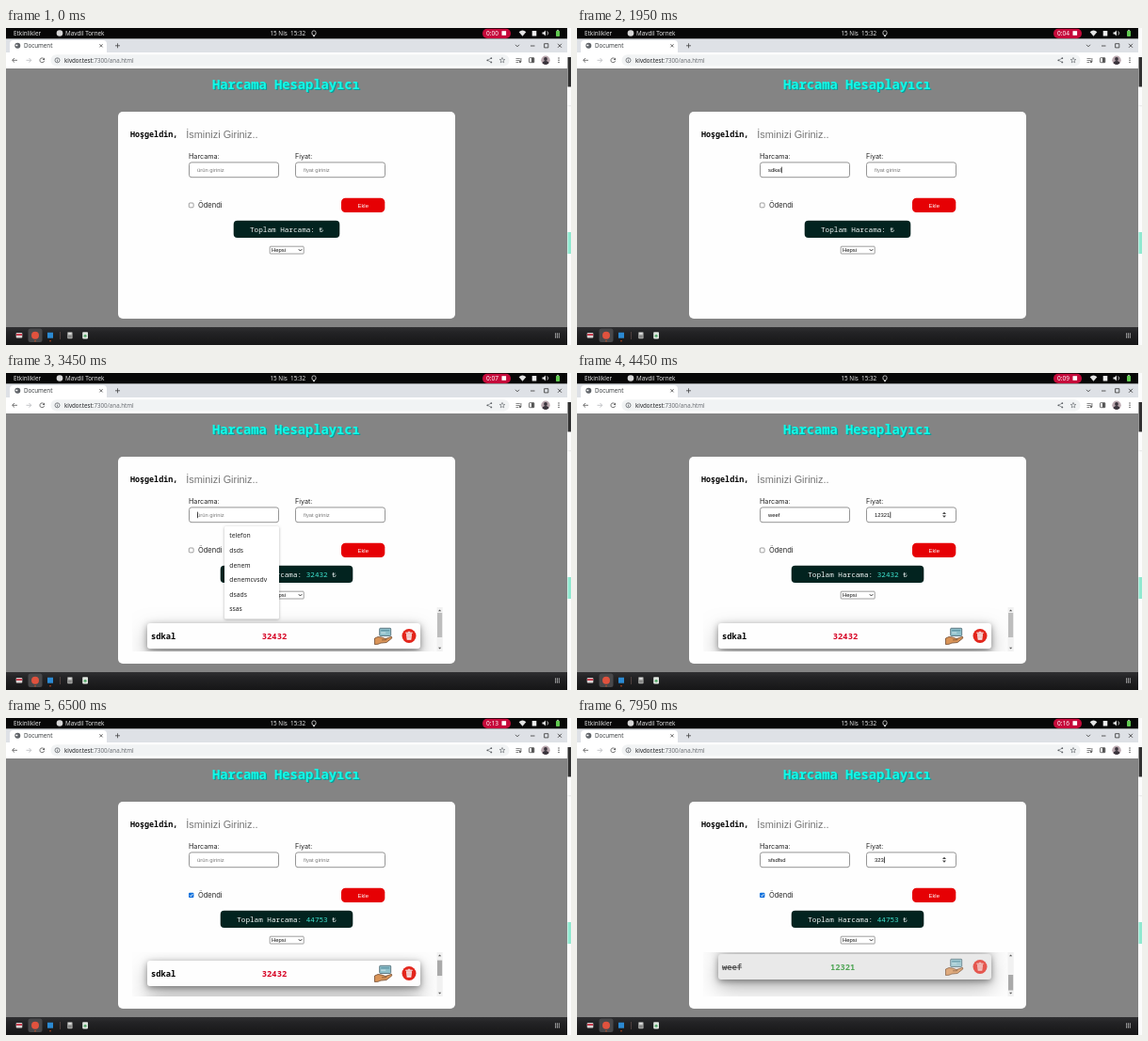
These frames come from a looping animation (600 px wide and 337 px high, 8000 ms). An HTML page with a canvas:

```html
<!DOCTYPE html>
<html lang="tr">
<head>
<meta charset="utf-8">
<title>Harcama Hesaplayıcı</title>
<style>
html, body { margin: 0; width: 100%; height: 100%; overflow: hidden; background: #848484; }
canvas { display: block; width: 600px; height: 337px; }
</style>
</head>
<body>
<canvas id="stage"></canvas>
<script>
const W = 600, H = 337, LOOP = 8000;
const canvas = document.getElementById('stage');
const ctx = canvas.getContext('2d');
const dpr = window.devicePixelRatio || 1;
canvas.width = W * dpr;
canvas.height = H * dpr;

const MONO = '"Noto Sans Mono", monospace';
const ARIAL = '"Liberation Sans", Arial, sans-serif';
const UI = '"Noto Sans", sans-serif';
const LABEL = 'Inter, sans-serif';

// Timelines: [time, value] pairs, the latest one reached applies.
const itemText = [
  [0, ''], [1550, 's'], [1600, 'sd'], [1700, 'sdk'], [1750, 'sdka'], [1950, 'sdkal'],
  [3000, ''], [3600, 'w'], [3650, 'we'], [3900, 'wee'], [3950, 'weef'],
  [6250, ''], [7150, 's'], [7200, 'sf'], [7300, 'sfs'], [7350, 'sfsd'],
  [7450, 'sfsdf'], [7500, 'sfsdfs'], [7600, 'sfsdfsd']
];
const priceText = [
  [0, ''], [2450, '3'], [2600, '32'], [2650, '324'], [2700, '3243'], [2800, '32432'],
  [3000, ''], [4300, '1'], [4350, '12'], [4400, '1232'], [4450, '12321'],
  [6250, ''], [7800, '3'], [7850, '32'], [7950, '323']
];
const focus = [
  [0, ''], [1450, 'item'], [2250, 'price'], [3000, ''], [3400, 'item'],
  [4150, 'price'], [4900, ''], [7050, 'item'], [7700, 'price']
];
const popup = [
  [0, ''], [1450, 'all'], [1550, 's'], [1600, ''], [3400, 'all'], [3600, ''],
  [7050, 'all'], [7150, 's'], [7200, '']
];
const scroll = [[0, 0], [6450, 1], [6500, 8], [6550, 36], [6600, 56]];
const suggestions = ['telefon', 'dsds', 'denem', 'denemcvsdv', 'dsads', 'ssas'];

function at(line, t) {
  let value = line[0][1];
  for (const [time, v] of line) if (t >= time) value = v;
  return value;
}

function rect(x, y, w, h, color) {
  ctx.fillStyle = color;
  ctx.fillRect(x, y, w, h);
}

function box(x, y, w, h, r, fill, stroke, line = 1) {
  ctx.beginPath();
  ctx.roundRect(x, y, w, h, r);
  if (fill) { ctx.fillStyle = fill; ctx.fill(); }
  if (stroke) { ctx.strokeStyle = stroke; ctx.lineWidth = line; ctx.stroke(); }
}

function disc(x, y, r, color) {
  ctx.beginPath();
  ctx.arc(x, y, r, 0, Math.PI * 2);
  ctx.fillStyle = color;
  ctx.fill();
}

function ring(x, y, r, color, from = 0, to = Math.PI * 2) {
  ctx.beginPath();
  ctx.arc(x, y, r, from, to);
  ctx.strokeStyle = color;
  ctx.lineWidth = 0.8;
  ctx.stroke();
}

function poly(points, fill, stroke, width = 0.8) {
  ctx.beginPath();
  points.forEach(([x, y], i) => i ? ctx.lineTo(x, y) : ctx.moveTo(x, y));
  if (fill) { ctx.closePath(); ctx.fillStyle = fill; ctx.fill(); }
  if (stroke) { ctx.strokeStyle = stroke; ctx.lineWidth = width; ctx.stroke(); }
}

function text(str, x, y, font, color) {
  ctx.font = font;
  ctx.fillStyle = color;
  ctx.fillText(str, x, y);
  return ctx.measureText(str).width;
}

function cross(x, y, r, color) {
  poly([[x - r, y - r], [x + r, y + r]], null, color);
  poly([[x + r, y - r], [x - r, y + r]], null, color);
}

function shadow(color, blur, dy) {
  ctx.shadowColor = color;
  ctx.shadowBlur = blur * dpr;
  ctx.shadowOffsetY = dy * dpr;
}

function noShadow() { shadow('transparent', 0, 0); }

function topBar(t) {
  rect(0, 0, 596, 11.5, '#070707');
  const font = `6.3px ${UI}`, ink = '#e4e4e4';
  text('Etkinlikler', 8, 8, font, ink);
  disc(57, 5.5, 3.3, '#d8d8d8');
  text('Mavdil Tornek', 63, 8, font, ink);
  text('15 Nis  15:32', 280.5, 8, font, ink);
  box(325, 3, 4, 4.5, 1.5, null, ink, 0.8);
  rect(326, 8, 2, 1, ink);

  box(506, 0.7, 30, 10.2, 5, '#c5093a');
  const s = Math.floor((t + 50) / 500);
  text('0:' + String(s).padStart(2, '0'), 510, 8, `6.6px ${UI}`, '#fff');
  rect(526.5, 3.2, 4.6, 4.6, '#fff');

  ctx.beginPath();
  ctx.moveTo(548.5, 8.8);
  ctx.arc(548.5, 8.8, 6, -Math.PI * 0.72, -Math.PI * 0.28);
  ctx.fillStyle = ink;
  ctx.fill();
  rect(558.7, 3, 4.6, 5.5, '#eee');
  poly([[569.5, 4.5], [571, 4.5], [573, 2.5], [573, 8.5], [571, 6.5], [569.5, 6.5]], ink);
  ring(573, 5.5, 2.6, ink, -0.9, 0.9);
  box(584, 2.7, 4, 6.3, 0.8, '#5fc94f');
  rect(585, 1.9, 2, 0.8, '#ddd');
}

function browserBar() {
  rect(0, 11.5, 596, 15, '#dee1e6');
  box(4, 13, 103, 15, [4, 4, 0, 0], '#fff');
  disc(12.3, 18.8, 3, '#5f6368');
  poly([[10, 18], [12, 17.4], [12.5, 19], [11, 19.6]], '#fff');
  text('Document', 19, 21, `6.2px ${UI}`, '#3c4043');
  cross(101, 18.8, 1.6, '#444');
  poly([[116, 18.8], [121, 18.8]], null, '#444');
  poly([[118.5, 16.3], [118.5, 21.3]], null, '#444');
  poly([[541, 17.8], [543, 19.8], [545, 17.8]], null, '#333');
  poly([[557, 19], [561.5, 19]], null, '#333');
  box(571.6, 16.7, 4.2, 4.2, 0, null, '#333', 0.8);
  cross(588, 18.8, 2, '#333');

  rect(0, 26, 596, 17, '#fff');
  poly([[12, 34.3], [6.7, 34.3]], null, '#555');
  poly([[9, 32], [6.7, 34.3], [9, 36.6]], null, '#555');
  poly([[21.5, 34.3], [26.7, 34.3]], null, '#b5b8bc');
  poly([[24.5, 32], [26.7, 34.3], [24.5, 36.6]], null, '#b5b8bc');
  ring(38.3, 34.3, 2.4, '#555', 0.2, 5.4);
  poly([[41, 31.5], [41, 34], [38.7, 34]], '#555');

  box(47.5, 28.2, 487, 12.2, 6, '#f1f3f4');
  ring(54.5, 34.3, 2.5, '#5f6368');
  rect(54.1, 34, 0.8, 1.8, '#5f6368');
  rect(54.1, 32.6, 0.8, 0.8, '#5f6368');
  const font = `6.2px ${UI}`;
  const w = text('kivdor.test', 62, 36.6, font, '#202124');
  text(':7300/ana.html', 62 + w, 36.6, font, '#6a6e73');

  poly([[515.3, 32.2], [511.3, 34.3], [515.3, 36.4]], null, '#5f6368', 0.6);
  [[515.3, 32.2], [511.3, 34.3], [515.3, 36.4]].forEach(([x, y]) => disc(x, y, 0.9, '#5f6368'));
  const star = [];
  for (let i = 0; i <= 10; i++) {
    const a = i * Math.PI / 5 - Math.PI / 2, r = i % 2 ? 1.3 : 3;
    star.push([527 + r * Math.cos(a), 34.4 + r * Math.sin(a)]);
  }
  poly(star, null, '#5f6368', 0.6);
  [32, 34, 36].forEach((y, i) => rect(541.5, y, i < 2 ? 4.3 : 2.8, 0.7, '#555'));
  rect(546.5, 32, 0.8, 4, '#555');
  disc(546, 36, 1.1, '#555');
  box(555.5, 31.7, 5.3, 5, 0.5, null, '#555', 0.8);
  rect(558, 31.7, 2.8, 5, '#555');

  disc(573, 34.3, 4.7, '#b9a7ae');
  ctx.save();
  ctx.beginPath();
  ctx.arc(573, 34.3, 4.7, 0, 7);
  ctx.clip();
  disc(573, 33, 1.9, '#39333b');
  disc(573, 38.5, 3.6, '#39333b');
  ctx.restore();
  [32, 34.3, 36.6].forEach(y => disc(587, y, 0.75, '#555'));
}

function dock() {
  const g = ctx.createLinearGradient(0, 318, 0, 337);
  g.addColorStop(0, '#303032');
  g.addColorStop(0.3, '#232325');
  g.addColorStop(1, '#161617');
  rect(0, 318, 596, 19, g);
  box(10.7, 324, 6.6, 5.5, 0.8, '#d9d3d3');
  rect(11, 325, 6, 2, '#c93f50');
  box(23.5, 319.5, 15, 14.5, 2.5, '#48484a');
  disc(31, 326.8, 4, '#e0523e');
  rect(44, 323.7, 6, 6, '#2b8ad3');
  disc(31, 332.7, 0.7, '#e95420');
  disc(47, 332.7, 0.7, '#e95420');
  rect(57.2, 323, 0.7, 8, '#63504d');
  box(65.2, 323.2, 5.4, 7, 0.7, '#a9aaa8');
  rect(66.2, 324.2, 3.4, 1.5, '#e6e6e6');
  [326.7, 328.3].forEach(y => rect(66.2, y, 3.4, 0.7, '#666'));
  box(81.2, 323.2, 5.8, 7.2, 0.8, '#dfe6df');
  disc(84.1, 327.2, 1.5, '#55a86b');
  for (let i = 0; i < 9; i++) {
    rect(583 + (i % 3) * 1.9, 324.5 + Math.floor(i / 3) * 1.9, 1.1, 1.1, '#ddd');
  }
}

function sideStrip() {
  rect(596, 0, 4, H, '#fcfcfc');
  rect(596.5, 31, 3.5, 31.5, '#303030');
  rect(596.5, 82.5, 3.5, 0.7, '#ddd');
  rect(596.5, 217, 3.5, 23, '#8fe9d0');
}

function field(x, value, hint, active, caret, spinner) {
  box(x + 0.5, 142.9, 95, 15.8, 2.5, '#fff', '#8b8b8b', 0.9);
  const font = `5.86px ${ARIAL}`;
  const w = text(value || hint, x + 9, 153, font, value ? '#111' : '#7b7b7b');
  if (active && caret) rect(x + 9.2 + (value ? w : 0), 147.6, 0.7, 6.6, '#000');
  if (spinner) {
    poly([[x + 81, 150.1], [x + 85, 150.1], [x + 83, 147.8]], '#444');
    poly([[x + 81, 151.4], [x + 85, 151.4], [x + 83, 153.7]], '#444');
  }
}

function form(t) {
  const active = at(focus, t);
  const caret = !(t >= 4750 && t < 4900);
  text('Harcama:', 194, 138.6, `7.2px ${LABEL}`, '#222');
  text('Fiyat:', 307, 138.6, `7.2px ${LABEL}`, '#222');
  field(194, at(itemText, t), 'ürün giriniz', active === 'item', caret, false);
  field(307, at(priceText, t), 'fiyat giriniz', active === 'price', caret, active === 'price');

  if (t >= 5650) {
    box(194, 185.7, 5.4, 5.4, 1, '#0b6fdc');
    poly([[195.2, 188.4], [196.4, 189.7], [198.3, 187]], null, '#fff', 0.9);
  } else {
    box(194.3, 186, 4.8, 4.8, 1, '#fff', '#767676', 0.7);
  }
  text('Ödendi', 204, 190.9, `7.5px ${LABEL}`, '#222');
  box(356, 180.8, 46.3, 15.3, 4.5, '#e60004');
  text('Ekle', 373.5, 190.5, `5.86px ${ARIAL}`, '#fff');
}

function total(t) {
  const sum = t < 3000 ? '' : t < 6250 ? '32432' : '44753';
  const half = sum ? 70.3 : 56.3;
  box(298 - half, 204.8, half * 2, 18.2, 4, '#02231f');
  const font = `7.67px ${MONO}`;
  const x = sum ? 245.2 : 259;
  let w = text('Toplam Harcama: ', x, 217, font, '#f2f6f5');
  if (sum) w += text(sum + ' ', x + w, 217, font, '#3fe3cf');
  text('₺', x + w, 217, font, '#f2f6f5');

  box(280.2, 232.2, 36, 7.8, 0.8, '#fff', '#767676', 0.7);
  text('Hepsi', 282, 238.2, `5.86px ${ARIAL}`, '#111');
  poly([[310.8, 235.2], [312.5, 237], [314.2, 235.2]], null, '#222', 0.9);
}

function payIcon(y) {
  box(396.7, y - 8.2, 12, 8.2, 0.8, '#8fc0cb', '#46616b', 0.8);
  rect(398.2, y - 6.4, 9, 1.3, '#5c93a3');
  rect(398.2, y - 3.8, 5, 0.9, '#d4e8ec');
  poly([[391.5, y + 2.5], [395, y + 1], [399, y + 1.6], [403, y + 3], [409.5, y + 0.8],
    [409.8, y + 2.4], [404, y + 7], [398, y + 7.6], [395, y + 8.8], [391.5, y + 9]],
    '#d99458', '#714b30', 0.8);
  poly([[399, y + 4.3], [403.5, y + 4.3], [404, y + 3]], null, '#714b30', 0.7);
}

function trashIcon(y) {
  disc(428, y, 7.5, '#e3251b');
  poly([[425, y - 2.3], [431, y - 2.3], [430.3, y + 4.2], [425.7, y + 4.2]], '#f6eeee');
  rect(424.3, y - 3.8, 7.4, 1.1, '#f6eeee');
  rect(426.8, y - 4.7, 2.4, 1, '#f6eeee');
  rect(426.7, y - 1.2, 0.6, 4, '#e0716b');
  rect(428.7, y - 1.2, 0.6, 4, '#e0716b');
}

function item(y, name, price, paid) {
  const fill = paid ? '#e9e9e9' : '#fefefe';
  shadow('rgba(0,0,0,.28)', 22, 9);
  box(150, y, 290, 27, 3, fill);
  shadow('rgba(0,0,0,.42)', 7, 2);
  box(150, y, 290, 27, 3, fill);
  noShadow();
  const mid = y + 13.5, font = `bold 8.8px ${MONO}`;
  ctx.globalAlpha = paid ? 0.75 : 1;
  const w = text(name, 154, mid + 3.2, font, paid ? '#333' : '#000');
  if (paid) rect(154, mid + 0.3, w, 0.9, '#333');
  text(price, paid ? 269 : 271.8, mid + 3.2, font, paid ? '#1d8f26' : '#d60022');
  payIcon(mid);
  trashIcon(mid);
  ctx.globalAlpha = 1;
}

function list(t) {
  if (t < 3000) return;
  const two = t >= 6250, top = at(scroll, t);
  ctx.save();
  ctx.beginPath();
  ctx.rect(134, 249, 330, 47);
  ctx.clip();
  item(266 - top, 'sdkal', '32432', false);
  if (two) item(307 - top, 'weef', '12321', true);
  rect(457.5, 249, 6.2, 47, '#f1f1f1');
  poly([[459, 253.3], [462.2, 253.3], [460.6, 251.5]], '#555');
  poly([[459, 291.7], [462.2, 291.7], [460.6, 293.5]], '#555');
  if (two) rect(458, 255 + top / 56 * 18, 5.2, 16.5, '#a9a9a9');
  else rect(458, 255, 5.2, 26, '#bdbdbd');
  ctx.restore();
}

function suggest(t) {
  const mode = at(popup, t);
  if (!mode) return;
  const rows = mode === 'all' ? suggestions : ['ssas'];
  shadow('rgba(0,0,0,.3)', 3, 0.8);
  box(232, 163, mode === 'all' ? 58 : 46, 4.5 + rows.length * 15.65, 1.5, '#fff');
  noShadow();
  rows.forEach((row, i) => text(row, 237.2, 175.2 + i * 15.65, `6.8px ${UI}`, '#222'));
}

function page(t) {
  rect(0, 43, 596, 275, '#848484');
  const font = `bold 13.76px ${MONO}`;
  text('Harcama Hesaplayıcı', 220.2, 66.4, font, '#0b9c98');
  text('Harcama Hesaplayıcı', 219, 65.4, font, '#12fbe9');
  box(119, 89, 358, 220, 5, '#fefefe');
  text('Hoşgeldin,', 132, 116, `bold 8.4px ${MONO}`, '#000');
  text('İsminizi Giriniz..', 191.3, 116.6, `10.9px ${ARIAL}`, '#757575');
  form(t);
  total(t);
  list(t);
  suggest(t);
}

function draw(now) {
  const t = now % LOOP;
  ctx.setTransform(dpr, 0, 0, dpr, 0, 0);
  page(t);
  sideStrip();
  topBar(t);
  browserBar();
  dock();
  requestAnimationFrame(() => draw(performance.now() - start));
}

const start = performance.now();
draw(0);
</script>
</body>
</html>
```
